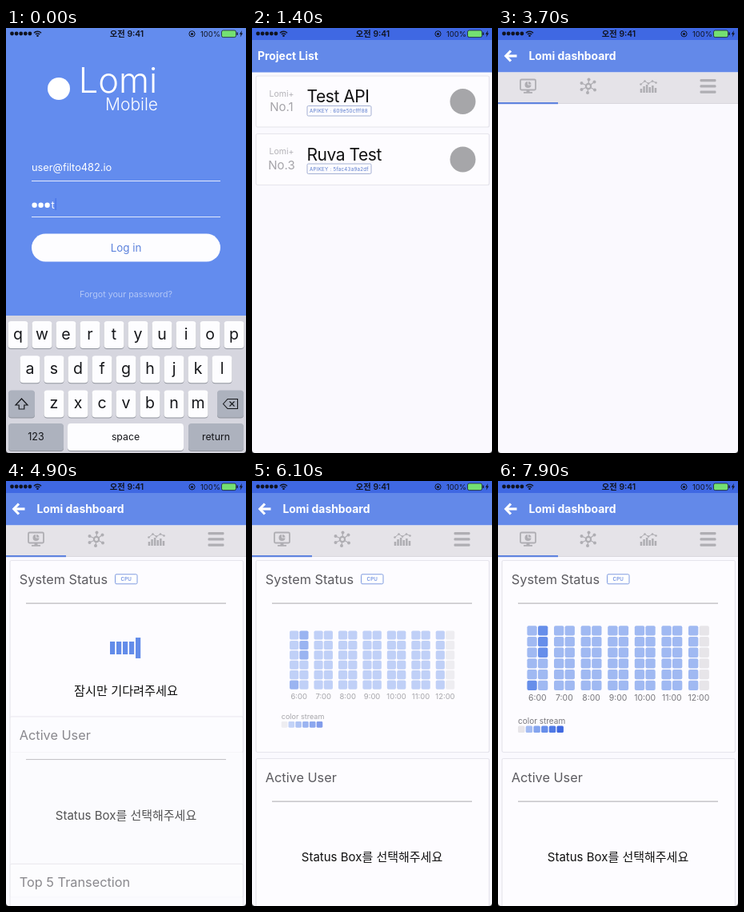
An HTML page with a canvas that plays this animation: 300x532 px, repeating every 8 s.

```html
<!DOCTYPE html>
<html lang="ko">
<head>
<meta charset="utf-8">
<title>Mobile app demo</title>
<style>
  html, body { margin: 0; width: 100%; height: 100%; overflow: hidden; background: #faf9fe; }
  canvas { display: block; width: 100vw; height: 100vh; }
</style>
</head>
<body>
<canvas id="stage"></canvas>
<script>
const W = 300, H = 532, LOOP = 8000;
const FONT = 'Inter, "Noto Sans CJK KR", "Noto Sans CJK", sans-serif';
const BLUE = '#638cee', BAR = '#3f68e3', HEAD = '#6389e9', PAGE = '#faf9fe';
const canvas = document.getElementById('stage');
const ctx = canvas.getContext('2d');
const scale = window.devicePixelRatio || 1;
canvas.width = W * scale;
canvas.height = H * scale;

const clamp = v => Math.max(0, Math.min(1, v));
const part = (t, start, length) => clamp((t - start) / length);
const smooth = u => u * u * (3 - 2 * u);
const easeOut = u => 1 - (1 - u) ** 3;

function rect(x, y, w, h, color) {
  ctx.fillStyle = color;
  ctx.fillRect(x, y, w, h);
}

function round(x, y, w, h, r, fill, stroke, line = 1) {
  ctx.beginPath();
  ctx.roundRect(x, y, w, h, r);
  if (fill) { ctx.fillStyle = fill; ctx.fill(); }
  if (stroke) { ctx.strokeStyle = stroke; ctx.lineWidth = line; ctx.stroke(); }
}

function dot(x, y, r, color) {
  ctx.beginPath();
  ctx.arc(x, y, r, 0, Math.PI * 2);
  ctx.fillStyle = color;
  ctx.fill();
}

function path(points, color, width, close) {
  ctx.beginPath();
  points.forEach(([x, y]) => ctx.lineTo(x, y));
  if (close) ctx.closePath();
  ctx.strokeStyle = color;
  ctx.lineWidth = width;
  ctx.stroke();
}

// y is the middle of the capital height
function text(str, x, y, size, color, { align = 'left', weight = 400, gap = 0 } = {}) {
  ctx.font = `${weight} ${size}px ${FONT}`;
  ctx.textAlign = align;
  ctx.textBaseline = 'alphabetic';
  ctx.letterSpacing = gap + 'px';
  ctx.fillStyle = color;
  ctx.fillText(str, x, y + size * 0.364);
}

function layer(draw, { x = 0, y = 0, alpha = 1 } = {}) {
  ctx.save();
  ctx.translate(x, y);
  ctx.globalAlpha *= alpha;
  draw();
  ctx.restore();
}

function statusBar() {
  const ink = '#10131f';
  for (let i = 0; i < 5; i++) dot(7.5 + i * 5.6, 7, 2.4, ink);
  ctx.strokeStyle = ink;
  ctx.lineWidth = 1.4;
  for (const r of [3.6, 6.2]) {
    ctx.beginPath();
    ctx.arc(39.5, 10.5, r, -Math.PI * 0.76, -Math.PI * 0.24);
    ctx.stroke();
  }
  dot(39.5, 9.8, 1.3, ink);
  text('오전 9:41', 151, 7.3, 10.3, ink, { align: 'center', weight: 600 });
  ctx.beginPath();
  ctx.arc(232.5, 7.3, 3.6, 0, Math.PI * 2);
  ctx.lineWidth = 1;
  ctx.strokeStyle = ink;
  ctx.stroke();
  round(231, 6.2, 3, 2.6, 0.5, ink);
  text('100%', 243, 7.3, 9.4, ink);
  round(269.5, 3, 18, 8.6, 2, '#74e072', ink, 0.7);
  rect(288.5, 5.5, 1.3, 3.4, ink);
  ctx.beginPath();
  [[295, 3], [291.8, 7.8], [293.6, 7.8], [292.8, 11.5], [296, 6.6], [294.2, 6.6]]
    .forEach(([x, y]) => ctx.lineTo(x, y));
  ctx.fillStyle = ink;
  ctx.fill();
}

// dark notches left by the rounded bottom of the screen
function corners() {
  const r = 4;
  ctx.beginPath();
  ctx.rect(0, H - r, W, r);
  ctx.roundRect(0, H - 4 * r, W, 4 * r, [0, 0, r, r]);
  ctx.save();
  ctx.clip('evenodd');
  rect(0, H - r, W, r, '#26262a');
  ctx.restore();
}

function key(label, cx, y, w, size, fill = '#fdfdff') {
  round(cx - w / 2, y + 1, w, 34, 4, '#8f939c');
  round(cx - w / 2, y, w, 34, 4, fill);
  text(label, cx, y + 16.7, size, '#15161a', { align: 'center' });
}

function keyboard() {
  const grey = '#adb2be';
  rect(0, 360, W, 172, '#d6d6df');
  ['qwertyuiop', 'asdfghjkl', 'zxcvbnm'].forEach((row, r) => {
    const left = [15, 30, 60][r];
    [...row].forEach((c, i) => {
      key('', left + i * 30, 367 + r * 43.3, 25, 19);
      text(c, left + i * 30, 382.7 + r * 43.3, 19.5, '#15161a', { align: 'center' });
    });
  });
  key('', 19.5, 453.6, 33, 12, grey);
  key('', 280.5, 453.6, 33, 12, grey);
  key('123', 37.5, 495, 69, 12.5, grey);
  key('space', 149.5, 495, 145, 12.3);
  key('return', 262.5, 495, 69, 12.3, grey);
  path([[19.5, 464], [27, 472], [22.8, 472], [22.8, 477], [16.2, 477], [16.2, 472], [12, 472]], '#15161a', 1.2, true);
  path([[271.5, 470.5], [277, 464.5], [289.5, 464.5], [289.5, 476.5], [277, 476.5]], '#15161a', 1.1, true);
  path([[279.5, 467.5], [285.5, 473.5]], '#15161a', 1.1);
  path([[285.5, 467.5], [279.5, 473.5]], '#15161a', 1.1);
}

function login(t) {
  rect(0, 0, W, H, BLUE);
  dot(66, 76, 14, '#fff');
  text('Lomi', 140, 65, 43.5, '#fff', { align: 'center', weight: 300 });
  text('Mobile', 190, 95, 21, '#fff', { align: 'right', weight: 300 });
  text('user@filto482.io', 32, 174.4, 12.8, '#fff');
  const typed = t >= 100;
  for (let i = 0; i < (typed ? 4 : 3); i++) dot(35.6 + i * 8, 221.8, 3.2, '#fff');
  if (!typed) text('t', 56.5, 221.3, 12.8, '#fff');
  rect(typed ? 65 : 61.5, 213, 1.4, 15, '#4a75e8');
  rect(32, 191, 236, 1, '#e3eafc');
  rect(32, 236, 236, 1, '#e3eafc');
  round(32, 257.5, 236, 35, 17.5, t > 140 ? '#dfe7fb' : '#fdfdff');
  text('Log in', 150, 275, 13.4, '#5c82dc', { align: 'center' });
  text('Forgot your password?', 150, 333.4, 10.7, '#b3c7f7', { align: 'center' });
  layer(keyboard, { y: 173 * smooth(part(t, 120, 180)) });
}

function header(title, x) {
  rect(0, 0, W, 15, BAR);
  rect(0, 15, W, 40.5, HEAD);
  text(title, x, 35.3, 13.9, '#fff', { weight: 700 });
}

function card(y, h) {
  round(4.5, y, 291, h, 2, '#fdfcff');
  round(5, y + 0.5, 291.5, h, 2, null, '#e6e5ec', 1.2);
}

function project(y, no, name, apiKey, avatarAlpha) {
  card(y, 64);
  text('Lomi+', 37, y + 22.5, 10.5, '#b3b2b7', { align: 'center' });
  text('No.' + no, 37, y + 39.5, 15, '#a5a4a9', { align: 'center' });
  text(name, 68.5, y + 26, 21, '#111', { gap: -0.45 });
  round(69, y + 38, 80, 12.5, 1.5, null, '#9aa8cf', 0.9);
  text('APIKEY : ' + apiKey, 72, y + 44.3, 6.2, '#5578cc', { gap: 0.25 });
  layer(() => dot(263.5, y + 32.5, 16, '#a6a6a9'), { alpha: avatarAlpha });
}

function projectList(t) {
  rect(0, 0, W, H, PAGE);
  header('Project List', 7);
  const p = smooth(part(t, 417, 300));
  const press = smooth(part(t, 2300, 200)) - smooth(part(t, 2700, 200));
  if (t < 417) return;
  project(59.5, 1, 'Test API', '609e50cfff88', 1 - 0.5 * press);
  layer(() => project(59.5 + 72.5 * p, 3, 'Ruva Test', '5fac43a9a2df', 1), { alpha: p ** 1.3 });
}

function tabs() {
  const ink = '#afaeb3';
  rect(0, 55.5, W, 39.5, '#e5e3e8');
  rect(0, 94.3, W, 0.7, '#d5d3da');
  rect(0, 93, 75, 2.2, '#5f83de');

  round(28, 64.5, 19, 13, 1.5, null, ink, 1.8);
  dot(37.5, 71, 4, ink);
  path([[37.5, 71], [37.5, 66.5]], '#e5e3e8', 0.9);
  path([[37.5, 71], [42, 71]], '#e5e3e8', 0.9);
  rect(35.5, 78, 4, 2.5, ink);
  rect(32, 80, 11, 1.8, ink);

  for (const [x, y] of [[104.5, 69], [113.5, 64.5], [120.5, 67.5], [121, 77.5], [112, 81], [104.5, 77]]) {
    path([[113, 73], [x, y]], ink, 1.3);
    dot(x, y, 2, ink);
  }
  dot(113, 73, 4.2, ink);
  dot(113, 73, 2, '#e5e3e8');

  [5, 8, 10, 7, 9, 6].forEach((h, i) => rect(177.7 + i * 3.6, 81 - h, 2.5, h, ink));
  const line = [[178.5, 70.5], [183.5, 66.5], [188, 69.5], [193, 66.5], [197.5, 68.5]];
  path(line, ink, 1);
  line.forEach(([x, y]) => dot(x, y, 1.3, ink));

  for (let i = 0; i < 3; i++) round(252.5, 64 + i * 7.3, 20, 3.2, 1.2, ink);
}

function loader(t) {
  for (let i = 0; i < 5; i++) {
    const from = (((t - 4500 - i * 100) % 1000) + 1500) % 1000 - 500;
    const h = 16 + 10 * clamp(1 - Math.abs(from) / 100);
    rect(130 + i * 8, 209 - h / 2, 6.2, h, '#638ce9');
  }
  text('잠시만 기다려주세요', 150, 262.5, 15.2, '#111', { align: 'center' });
}

function heatmap() {
  for (let col = 0; col < 14; col++) {
    const x = 36.4 + (col >> 1) * 33.6 + (col % 2) * 13.6;
    for (let row = 0; row < 6; row++) {
      const high = (col === 0 && row === 5) || (col === 1 && row < 3);
      const color = col === 13 ? '#e7e5e9' : high ? '#668eea' : '#a0b9f2';
      round(x, 181.2 + row * 13.7, 12.3, 12.3, 2, color);
    }
  }
  for (let i = 0; i < 7; i++) {
    text(`${6 + i}:00`, 49.3 + i * 33.6, 271.5, 10.4, '#77767b', { align: 'center' });
  }
  text('color stream', 25, 300, 10, '#77767b');
  ['#e7e5e9', '#a3bbf2', '#84a4ee', '#678eea', '#507ae6', '#4069e0']
    .forEach((c, i) => round(25 + i * 9.7, 306.6, 8.4, 8.4, 1.5, c));
}

function panel(y, h, title) {
  card(y, h);
  text(title, 16.8, y + 23.6, 16.3, '#5c5b60');
  rect(25, y + 53.6, 250, 1, '#aaa9ad');
}

function dashboard(t) {
  rect(0, 0, W, H, PAGE);
  if (t >= 4600) {
    const p = smooth(part(t, 4690, 300));
    const alpha = p ** 1.4;
    const top = 99, second = top + 248 * p, third = second + 234 * p;
    panel(top, 240, 'System Status');
    round(136.5, 116.8, 27.5, 12, 1.5, '#fff', '#7f9be0', 1);
    text('CPU', 150.3, 122.8, 6.2, '#5d82de', { align: 'center', weight: 500, gap: 0.2 });
    if (t < 5920) {
      loader(t);
    } else {
      const u = smooth(part(t, 5920, 300));
      const s = 1 - 0.27 * (1 - u);
      layer(() => {
        ctx.translate(150, 248);
        ctx.scale(s, s);
        ctx.translate(-150, -248);
        heatmap();
      }, { alpha: u });
    }
    layer(() => {
      panel(second, 226, 'Active User');
      text('Status Box를 선택해주세요', 150, second + 123.8, 15, '#111', { align: 'center' });
    }, { alpha });
    layer(() => panel(third, 226, 'Top 5 Transection'), { alpha });
  }
  header('Lomi dashboard', 38.5);
  path([[16, 28.5], [9.8, 35], [16, 41.5]], '#fff', 3.2);
  path([[10, 35], [23.5, 35]], '#fff', 3.2);
  tabs();
}

function render(t) {
  ctx.setTransform(scale, 0, 0, scale, 0, 0);
  const toList = easeOut(part(t, 200, 210));
  const toDash = easeOut(part(t, 2950, 400));
  if (toList < 1) layer(() => login(t), { x: -90 * toList });
  if (toList > 0 && toDash < 1) layer(() => projectList(t), { x: W * (1 - toList) - 90 * toDash });
  if (toDash > 0) layer(() => dashboard(t), { x: W * (1 - toDash) });
  statusBar();
  corners();
}

const begin = performance.now();
function tick() {
  render((performance.now() - begin) % LOOP);
  requestAnimationFrame(tick);
}
tick();
</script>
</body>
</html>
```
